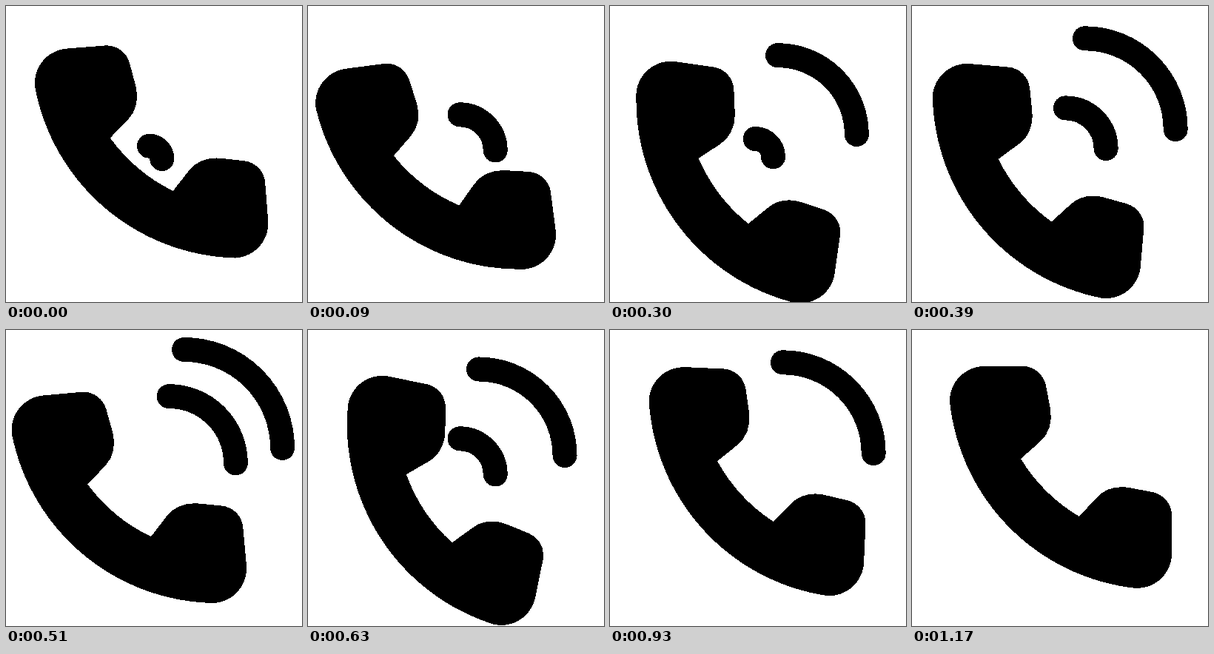
These frames come from a looping animation (400x400 px, 1.2 s). An HTML page:

```html
<!DOCTYPE html>
<html lang="en">
<head>
<meta charset="utf-8">
<title>Ringing phone</title>
<style>
  html, body { margin: 0; width: 100%; height: 100%; overflow: hidden; background: #fff; }
  svg { display: block; width: 100vw; height: 100vh; shape-rendering: crispEdges; }
  .wave { fill: none; stroke: #000; stroke-width: 33; stroke-linecap: round; }
</style>
</head>
<body>
<svg viewBox="0 0 400 400">
  <path id="phone" d="M97 49H150C165 49 178 60 181 75L187 107C190 124 185 141 173 151L147 174Q177 223 226 252L249 227C259 215 276 210 293 213L325 219C340 222 351 235 351 250V303A47 47 0 0 1 303 349A283 283 0 0 1 51 97A47 47 0 0 1 97 49Z"/>
  <path class="wave"/>
  <path class="wave"/>
  <path class="wave"/>
</svg>
<script>
const LOOP = 1200, STEP = 30, WAVE_LIFE = 535;
const WAVE_STARTS = [0, 280, 540];

// Turning points of the swing: [time in ms, degrees].
const SWING = [[-30, 0], [30, -9], [345, 9], [480, -7], [625, 11.5], [1070, 0]];

// Cosine ease from 0 to 1 between two times; also runs backwards.
function ease(t, from, to) {
  const p = Math.min(1, Math.max(0, (t - from) / (to - from)));
  return (1 - Math.cos(Math.PI * p)) / 2;
}

function tilt(t) {
  let angle = 0;
  for (let i = 1; i < SWING.length; i++) {
    const [from, a] = SWING[i - 1], [to, b] = SWING[i];
    angle += (b - a) * ease(t, from, to);
  }
  return angle;
}

// Quarter circle that widens while its centre drifts up and right.
function wavePath(age) {
  if (age < 0 || age > WAVE_LIFE) return '';
  const p = age / 510;
  const r = 133.5 * Math.sin(0.13 + 1.357 * p);
  const x = 193.5 + 69 * p - 22 * p * p, y = 400 - x;
  return `M${x} ${y - r}A${r} ${r} 0 0 1 ${x + r} ${y}`;
}

const phone = document.getElementById('phone');
const waves = document.querySelectorAll('.wave');

function draw(now) {
  const t = Math.floor(now % LOOP / STEP) * STEP;
  const shift = 35 * ease(t, -30, 160) * ease(t, 1095, 375);
  phone.setAttribute('transform', `translate(${-shift} ${shift}) rotate(${tilt(t)} 173 227)`);
  waves.forEach((wave, i) => wave.setAttribute('d', wavePath(t - WAVE_STARTS[i])));
}

const start = performance.now();
function tick() {
  draw(performance.now() - start);
  requestAnimationFrame(tick);
}
tick();
</script>
</body>
</html>
```
